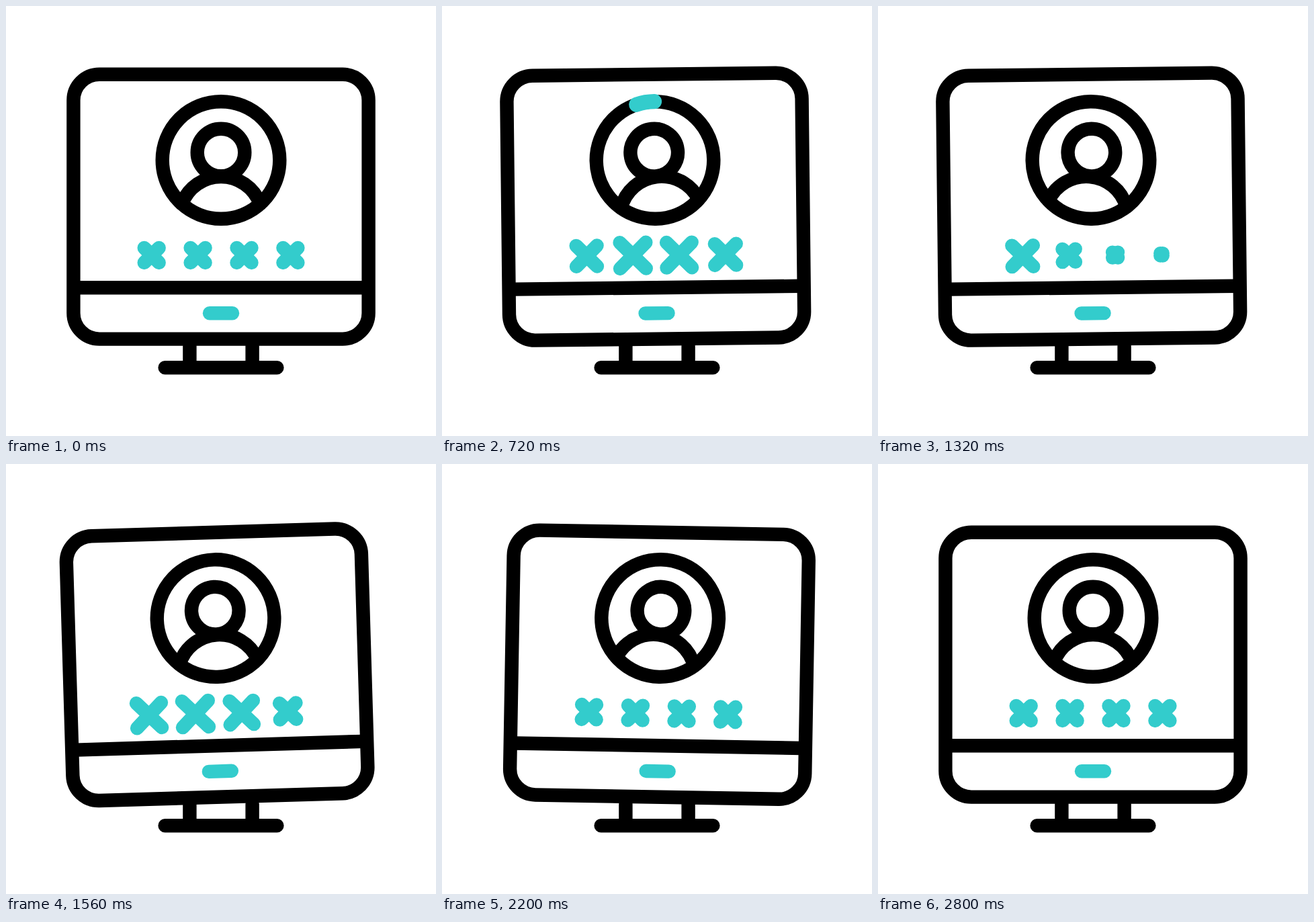
An HTML page for the animation above (3000 ms loop, 640 px wide and 640 px high).

```html
<!DOCTYPE html>
<html lang="en">
<head>
<meta charset="utf-8">
<title>Account login</title>
<style>
  html, body { margin: 0; width: 100%; height: 100%; overflow: hidden; background: #fff; }
  svg { display: block; width: 100vw; height: 100vh; }
  g { fill: none; stroke: #000; stroke-width: 20.4; stroke-linecap: round; }
  .accent { stroke: #3cc; }
  #sweep { stroke-width: 22.2; }
</style>
</head>
<body>
<svg viewBox="0 0 640 640">
  <g>
    <path d="M273.4 506V538M366.6 506V538M236.6 538.2H403.4"/>
    <g id="monitor">
      <rect x="100.4" y="101.7" width="439.2" height="393.9" rx="38.6"/>
      <path d="M106 419.2H534"/>
      <circle cx="320" cy="229.5" r="87.3"/>
      <g id="user">
        <circle cx="320" cy="218" r="35.3"/>
        <path d="M261.9 294.5A62 62 0 0 1 378.1 294.5"/>
      </g>
      <path id="sweep" class="accent"/>
      <path class="accent" d="M303 457.3H337"/>
      <path id="marks" class="accent"/>
    </g>
  </g>
</svg>
<script>
const LOOP = 3000, STEP = 40;
const [monitor, user, sweep, marks] =
  ['monitor', 'user', 'sweep', 'marks'].map(id => document.getElementById(id));

// Sine-eased progress from 0 to 1
function glide(t, start, length) {
  const p = Math.min(1, Math.max(0, (t - start) / length));
  return (1 - Math.cos(Math.PI * p)) / 2;
}

const tilt = t => -1.6 * glide(t, 220, 320) + 2.88 * glide(t, 540, 460)
  - 3 * glide(t, 1000, 540) + 2.84 * glide(t, 1540, 540) - 1.12 * glide(t, 2080, 560);

// Five even swings; the first and last go only half way
function sway(t) {
  let angle = 0;
  for (let i = 0; i < 5; i++) {
    const size = i % 4 ? 11.6 : 5.8;
    angle += (i % 2 ? size : -size) * glide(t, 240 + 505 * i, 505);
  }
  return angle;
}

const arm = t => 11 + 8.5 * glide(t, 210, 380) - 17.8 * glide(t, 600, 380)
  + 17.8 * glide(t, 1020, 430) - 8.5 * glide(t, 1450, 500);

// The arc runs around the ring twice
const head = t => glide(t, 240, 417) + glide(t, 780, 505);
const tail = t => glide(t, 343, 440) + glide(t, 904, 396);

function ringPoint(turn) {
  const a = (turn - 0.25) * 2 * Math.PI;
  return `${320 + 87.3 * Math.cos(a)} ${229.5 + 87.3 * Math.sin(a)}`;
}

function arc(from, to) {
  if (to - from < 0.002) return '';
  return `M${ringPoint(from)}A87.3 87.3 0 ${to - from > 0.5 ? 1 : 0} 1 ${ringPoint(to)}`;
}

function cross(x, y, r) {
  return `M${x - r} ${y - r}L${x + r} ${y + r}M${x + r} ${y - r}L${x - r} ${y + r}`;
}

function draw(t) {
  monitor.setAttribute('transform', `rotate(${tilt(t)} 320 496)`);
  user.setAttribute('transform', `rotate(${sway(t)} 320 229.5)`);
  sweep.setAttribute('d', arc(tail(t), head(t)));
  marks.setAttribute('d', [0, 1, 2, 3].map(i =>
    cross(216.7 + 68.9 * i, 371, arm(t - 100 * i))).join(''));
}

const start = performance.now();
function tick() {
  const t = (performance.now() - start) % LOOP;
  draw(Math.floor(t / STEP) * STEP);
  requestAnimationFrame(tick);
}
tick();
</script>
</body>
</html>
```
